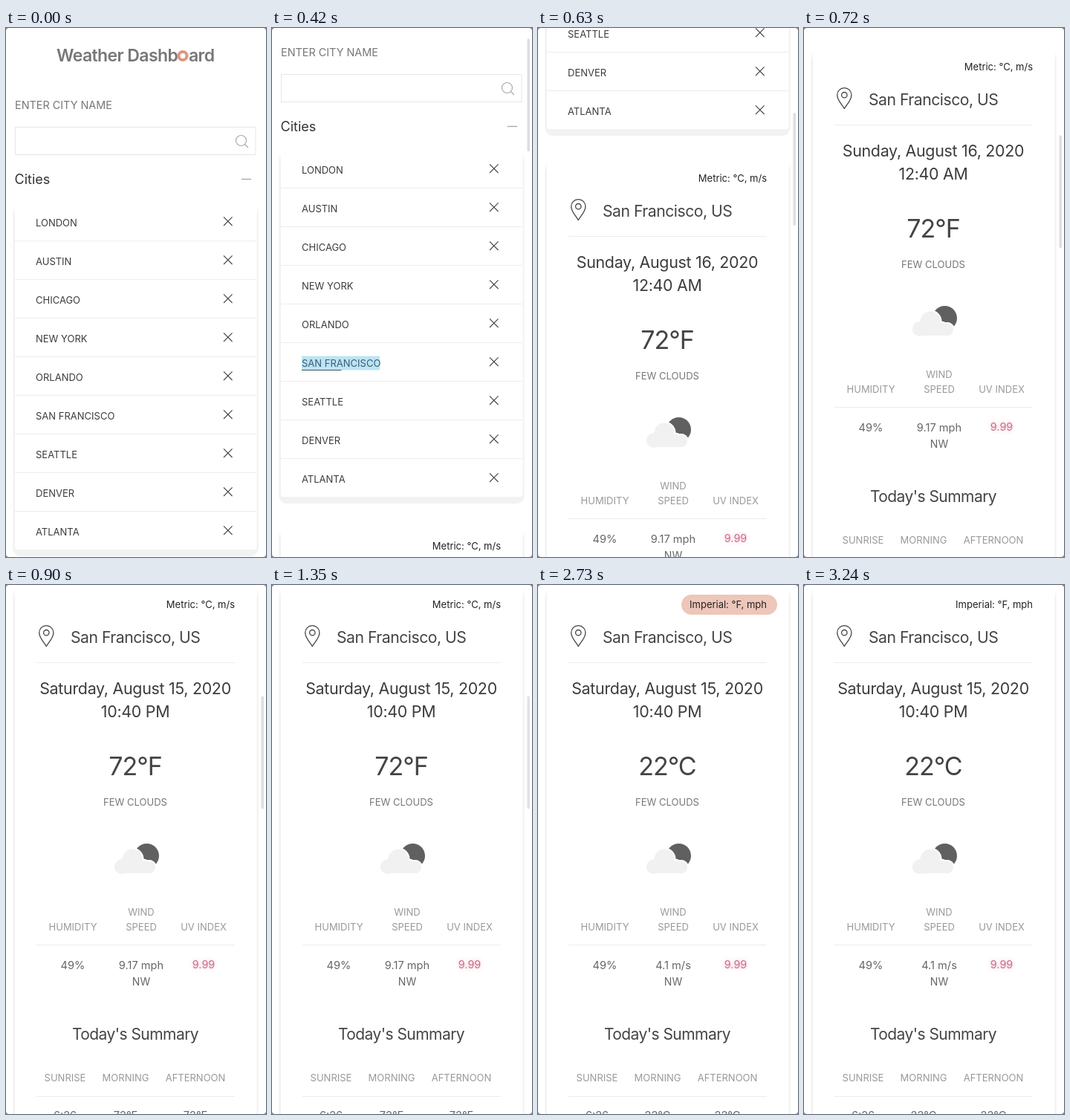
An HTML page with a canvas for the animation above (3.45 s loop, 350 by 712 pixels).

```html
<!DOCTYPE html>
<html lang="en">
<head>
<meta charset="utf-8">
<title>Weather Dashboard</title>
<style>
html, body { margin: 0; width: 100%; height: 100%; overflow: hidden; background: #fff; }
canvas { display: block; width: 350px; height: 712px; }
</style>
</head>
<body>
<canvas id="stage"></canvas>
<script>
const W = 350, H = 712, LOOP = 3450, STEP = 30;
const canvas = document.getElementById('stage');
const ctx = canvas.getContext('2d');
const dpr = window.devicePixelRatio || 1;
canvas.width = W * dpr;
canvas.height = H * dpr;

const cities = ['LONDON', 'AUSTIN', 'CHICAGO', 'NEW YORK', 'ORLANDO',
  'SAN FRANCISCO', 'SEATTLE', 'DENVER', 'ATLANTA'];
const ROW = 52, CARD2 = 746, MAX_SCROLL = 742;

// 0..1 progress of t between a and b
const prog = (t, a, b) => Math.min(1, Math.max(0, (t - a) / (b - a)));
const sine = p => (1 - Math.cos(Math.PI * p)) / 2;
const easeOut = p => 1 - (1 - p) * (1 - p);

// y is the middle of the capital letters
function text(str, x, y, size, color, { align = 'center', weight = 400, gap = 0 } = {}) {
  ctx.font = `${weight} ${size}px Inter, "Open Sans", sans-serif`;
  ctx.letterSpacing = gap + 'px';
  ctx.textAlign = align;
  ctx.fillStyle = color;
  ctx.fillText(str, x, y + size * 0.364);
}

function line(color, width, ...pts) {
  ctx.beginPath();
  for (let i = 0; i < pts.length; i += 4) {
    ctx.moveTo(pts[i], pts[i + 1]);
    ctx.lineTo(pts[i + 2], pts[i + 3]);
  }
  ctx.strokeStyle = color;
  ctx.lineWidth = width;
  ctx.stroke();
}

function ring(x, y, r, color, width) {
  ctx.beginPath();
  ctx.arc(x, y, r, 0, 7);
  ctx.strokeStyle = color;
  ctx.lineWidth = width;
  ctx.stroke();
}

function pill(x, y, w, h, r, color) {
  ctx.beginPath();
  ctx.roundRect(x, y, w, h, r);
  ctx.fillStyle = color;
  ctx.fill();
}

function card(top, bottom) {
  const fade = ctx.createLinearGradient(0, top, 0, top + 14);
  fade.addColorStop(0, '#f2f2f200');
  fade.addColorStop(1, '#f2f2f2');
  pill(9.3, top, 330.4, bottom - top + 9, [0, 0, 11, 11], fade);
  pill(12, top, 325.5, bottom - top, [0, 0, 3, 3], '#fff');
}

function header() {
  const title = { align: 'left', weight: 600, gap: -0.6 };
  text('Weather Dashb', 68, 36.5, 23, '#777', title);
  ring(238, 37.5, 5.6, '#dd9780', 4);
  text('ard', 246, 36.5, 23, '#777', title);
  text('ENTER CITY NAME', 12, 104, 14.4, '#777', { align: 'left' });
  ctx.strokeStyle = '#e6e6e6';
  ctx.lineWidth = 1;
  ctx.strokeRect(12.5, 133.5, 323.5, 37);
  ring(316.5, 151.5, 7, '#aaa', 1.2);
  line('#aaa', 1.2, 321.5, 156.5, 326, 161);
  text('Cities', 11.5, 203, 18, '#333', { align: 'left' });
  line('#aaa', 1.4, 317, 203.5, 330, 203.5);
}

function cityList(t) {
  card(238, 702);
  cities.forEach((name, i) => {
    const y = 262 + ROW * i, x = 298.8, c = y - 1.8, r = 5.8;
    text(name, 40, y - 0.2, 13, '#3c3c3c', { align: 'left' });
    line('#444', 1.1, x - r, c - r, x + r, c + r, x - r, c + r, x + r, c - r);
    if (i < 8) line('#ededed', 1, 12, y + 24.5, 337, y + 24.5);
  });
  const grow = easeOut(prog(t, 330, 630));
  if (grow) line('#444', 1, 40, 531.5, 40 + 105 * grow, 531.5);
  const tap = prog(t, 240, 300) * (1 - prog(t, 430, 520));
  ctx.fillStyle = `rgba(51,171,222,${0.32 * tap})`;
  ctx.fillRect(40, 512.5, 105, 19);
}

function pin(x, y) {
  ctx.beginPath();
  ctx.moveTo(x, y + 17.5);
  ctx.bezierCurveTo(x - 3, y + 12, x - 9.6, y + 6, x - 9.6, y - 1);
  ctx.arc(x, y - 1, 9.6, Math.PI, 0);
  ctx.bezierCurveTo(x + 9.6, y + 6, x + 3, y + 12, x, y + 17.5);
  ctx.strokeStyle = '#444';
  ctx.lineWidth = 1.3;
  ctx.stroke();
  ring(x, y - 1, 3.7, '#444', 1.3);
}

function cloud(x, y) {
  const puffs = [[-27, 11, 10], [-13, 1, 13.5], [2, 10, 7.5], [9, 12, 8]];
  const shape = (grow, color) => {
    ctx.fillStyle = color;
    for (const [px, py, r] of puffs) {
      ctx.beginPath();
      ctx.arc(x + px, y + py, r + grow, 0, 7);
      ctx.fill();
    }
    pill(x - 37 - grow, y + 4 - grow, 55 + 2 * grow, 16 + 2 * grow, 8 + grow, color);
  };
  pill(x - 10, y - 20, 33, 33, 16.5, '#606060');
  shape(2, '#fff');
  shape(0, '#f1f1f1');
}

function weather(t) {
  const metric = t >= 2220, local = t >= 900, fresh = t >= 600;
  const rule = y => line('#ececec', 1, 41, y, 308, y);
  const date = { gap: -0.28 };
  card(CARD2, CARD2 + 900);

  const glow = 0.65 * prog(t, 2182, 2430) * (1 - prog(t, 2670, 3180));
  if (glow) pill(193, 755, 129, 27, 13.5, `rgba(225,155,135,${glow})`);
  text(metric ? 'Imperial: °F, mph' : 'Metric: °C, m/s', 308, 768.2, 13, '#222', { align: 'right' });

  pin(54.3, 807.2);
  text('San Francisco, US', 87, 812, 21.2, '#444', { align: 'left', gap: -0.5 });
  rule(846.5);
  text(local ? 'Saturday, August 15, 2020' : 'Sunday, August 16, 2020', 174, 881.7, 21.4, '#3c3c3c', date);
  text(local ? '10:40 PM' : '12:40 AM', 174, 912.7, 21.4, '#3c3c3c', date);
  const temp = metric ? '22°C' : fresh ? '72°F' : '70°F';
  text(temp, 174, 985.2, 34, '#444', { gap: -1 });
  text(fresh ? 'FEW CLOUDS' : 'SCATTERED CLOUDS', 174, 1034, 13, '#777');
  cloud(183, 1110);

  text('WIND', 182, 1182, 13, '#999');
  [['HUMIDITY', 90], ['SPEED', 182], ['UV INDEX', 266]].forEach(([s, x]) =>
    text(s, x, 1202, 13, '#999'));
  rule(1226.5);
  text('49%', 90, 1253.2, 14.6, '#666');
  text(metric ? '4.1 m/s' : '9.17 mph', 182, 1253.2, 14.6, '#666');
  text('NW', 182, 1276.2, 14, '#666');
  ctx.shadowColor = '#f0b4c4';
  ctx.shadowBlur = 5 * dpr;
  text('9.99', 266, 1253.2, 14.4, '#c8708a');
  ctx.shadowBlur = 0;
  ctx.shadowColor = 'transparent';

  text("Today's Summary", 174, 1346.2, 21, '#444', { gap: -0.55 });
  [['SUNRISE', local ? '6:26' : '8:26', 79.5], ['MORNING', temp, 161], ['AFTERNOON', temp, 255]]
    .forEach(([s, value, x]) => {
      text(s, x, 1405.3, 13, '#999');
      text(value, x, 1455.3, 14.6, '#666');
    });
  rule(1430.5);
}

function corners() {
  ctx.beginPath();
  ctx.rect(0, 0, W, H);
  ctx.roundRect(0, 0, W, H, 4);
  ctx.fillStyle = '#777';
  ctx.fill('evenodd');
}

function draw(t) {
  const scroll = Math.round(MAX_SCROLL * sine(prog(t, 331.6, 772.6)));
  ctx.setTransform(dpr, 0, 0, dpr, 0, 0);
  ctx.fillStyle = '#fff';
  ctx.fillRect(0, 0, W, H);
  ctx.save();
  ctx.translate(0, -scroll);
  header();
  cityList(t);
  weather(t);
  ctx.restore();
  const bar = prog(t, 330, 360) * (1 - prog(t, 1335, 1470));
  if (bar) pill(343.5, scroll * 0.2015, 3.5, 152, 1.75, `rgba(200,200,200,${0.6 * bar})`);
  corners();
}

const start = performance.now();
function tick() {
  const t = (performance.now() - start) % LOOP;
  draw(Math.floor(t / STEP) * STEP);
  requestAnimationFrame(tick);
}
tick();
</script>
</body>
</html>
```
